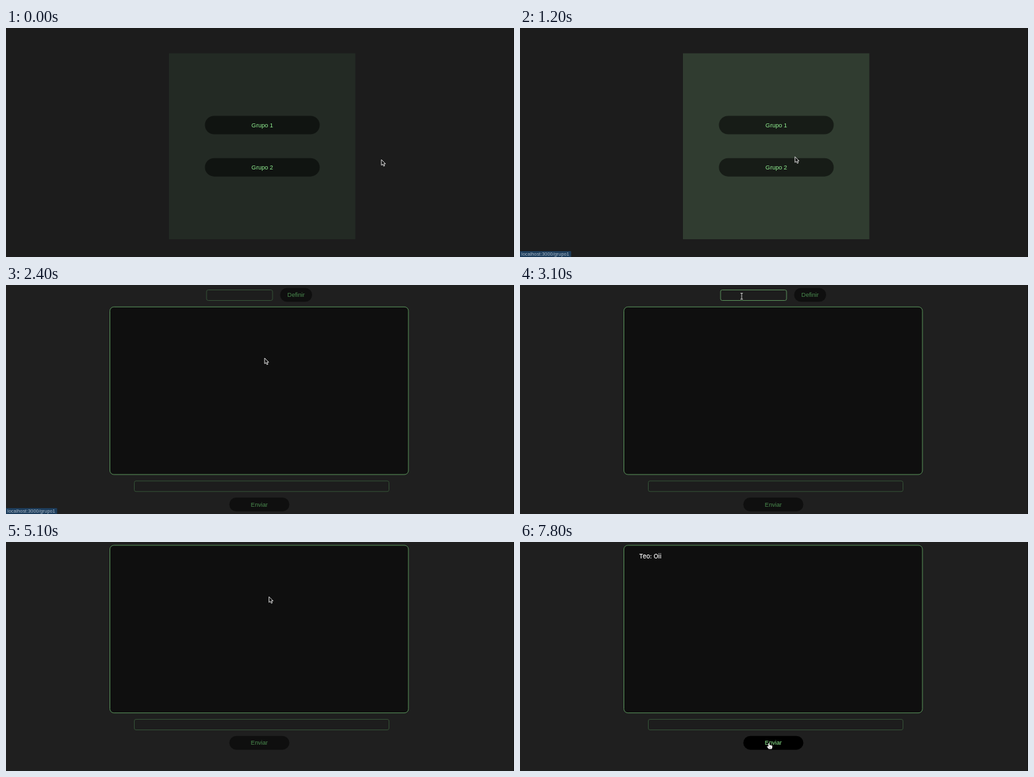
An HTML page for the animation above (8 s loop, 770 by 348 pixels).

```html
<!DOCTYPE html>
<html lang="pt">
<head>
<meta charset="utf-8">
<style>
  html, body { margin: 0; width: 100%; height: 100%; overflow: hidden; background: #1c1c1c; }
  svg { display: block; width: 770px; height: 348px; }
  text { font: 9px "Liberation Sans", Arial, sans-serif; white-space: pre; }
  .button { text-anchor: middle; font-size: 9.1px; }
  .status { font-size: 7.4px; }
  .message { font: 500 9.4px Inter, sans-serif; }
</style>
</head>
<body>
<svg id="stage" viewBox="0 0 770 348"></svg>
<script>
const LOOP = 8000, STEP = 100;
const ENTER = 2400, NAMED = 5000, SENT = 7700;
const NICK = 'Teo', TEXT = 'Oii';
const LIGHT = [144, 238, 144], DIM = [74, 138, 78], FOCUS = [122, 198, 122], EDGE = [52, 80, 54];

const stage = document.getElementById('stage');
const pen = document.createElement('canvas').getContext('2d');
pen.font = '9px "Liberation Sans", Arial, sans-serif';

const ramp = (t, from, length) => Math.min(1, Math.max(0, (t - from) / length));
const ease = p => p * p * (3 - 2 * p);
const blend = (a, b, p) => a.map((v, i) => v + (b[i] - v) * p);
const mix = (a, b, p) => `rgb(${blend(a, b, p).map(Math.round)})`;
const typed = (t, text, from) => text.slice(0, Math.max(0, Math.floor((t - from) / 150) + 1));

const rect = (x, y, w, h, r, fill, more = '') =>
  `<rect x="${x}" y="${y}" width="${w}" height="${h}" rx="${r}" fill="${fill}" ${more}/>`;
const label = (x, y, s, fill, kind = '') =>
  `<text x="${x}" y="${y}" fill="${fill}" class="${kind}">${s}</text>`;

// Pointer moves: where each ends, when it starts and how long it takes
const moves = [
  { at: [462, 98], from: 0, length: 300 },
  { at: [424, 150], from: 500, length: 500 },
  { at: [416, 201], from: 1000, length: 250 },
  { at: [411, 149], from: 1600, length: 300 },
  { at: [392, 111], from: 2300, length: 100 },
  { at: [336, 17], from: ENTER, length: 700 },
  { at: [436, 15], from: 4400, length: 400 },
  { at: [292, 278], from: NAMED, length: 300 },
  { at: [377, 305.5], from: 6800, length: 600 }
];
const position = t =>
  moves.reduce((p, m) => blend(p, m.at, ease(ramp(t, m.from, m.length))), [569, 200]);

// Pointer shapes with their hot spot at 0,0
const pointers = {
  arrow: '<path d="M0 0V8.6L2 6.9L3.5 10L5 9.3L3.6 6.3H6.2Z" fill="#111" stroke="#eee" stroke-width=".9"/>',
  hand: '<path d="M-1 .7Q0-.6 1 .7L1.4 3.2Q2.8 2.4 3.4 3.5Q5 2.9 5.6 4.4V6.6L4.6 9.2H0L-2.8 5.6Q-2.6 4.3-.6 5Z" fill="#fff" stroke="#222" stroke-width=".5"/>' +
    '<path d="M1.2 5.8V7.8M2.7 5.8V7.8" stroke="#444" stroke-width=".5"/>',
  beam: '<path d="M-1.8-4.5H1.8M0-4.5V4.5M-1.8 4.5H1.8" fill="none" stroke="#ddd" stroke-width=".9"/>'
};

const button = (name, x, y, w, h, base = DIM) =>
  ({ name, x, y, w, h, base, pointer: 'hand', draw: drawButton });
const field = (x, y, w, text, focus, caret) =>
  ({ x, y, w, h: 17, text, focus, caret, pointer: 'beam', draw: drawField });

// Controls on the page at a given time
function controls(t) {
  if (t < ENTER) return [1, 2].map(n => button('Grupo ' + n, 301.5, 69.3 + 64.2 * n, 174, 28, LIGHT));
  const top = t < NAMED ? 0 : -28.3;
  const list = [
    field(194, 297.3 + top, 387, t < SENT ? typed(t, TEXT, 6100) : '',
      ramp(t, 5300, 300) - ramp(t, 7600, 200), t >= 5400 && t < SENT),
    button('Enviar', 338.5, 323 + top, 91, 21)
  ];
  if (t < NAMED) list.push(
    field(303.5, 7, 101, typed(t, NICK, 3650), ramp(t, 3000, 200) - ramp(t, 4800, 200), t >= 3200 && t < 4900),
    button('Definir', 415.5, 4.5, 48.5, 21));
  return list;
}

function target(t) {
  const [x, y] = position(t);
  return controls(t).find(c => x >= c.x && x <= c.x + c.w && y >= c.y && y <= c.y + c.h);
}

// Hover fades over two steps
const hover = (t, name) => [t, t - STEP].filter(s => target(s)?.name === name).length / 2;

function drawButton(c, t) {
  const p = hover(t, c.name);
  return rect(c.x, c.y, c.w, c.h, c.h / 2, '#000', `fill-opacity="${0.53 + 0.47 * p}"`) +
    label(c.x + c.w / 2, c.y + c.h / 2 + 3.2, c.name, mix(c.base, LIGHT, p), 'button');
}

function drawField(c) {
  const end = c.x + 3.3 + pen.measureText(c.text).width;
  return rect(c.x + .5, c.y + .5, c.w - 1, c.h - 1, 2.5, '#1d1d1d', `stroke="${mix(EDGE, FOCUS, c.focus)}"`) +
    label(c.x + 3, c.y + 11.3, c.text, '#fff') +
    (c.caret ? rect(end, c.y + 3.5, .8, 10, 0, '#ddd') : '');
}

function page(t) {
  if (t < ENTER) return rect(0, 0, 770, 348, 0, '#1c1c1c') +
    rect(247, 38.5, 282.5, 282.5, 0, mix([35, 42, 36], [48, 60, 48], ramp(t, 0, 300)));
  return rect(0, 0, 770, 348, 0, '#1f1f1f') +
    rect(157.5, t < NAMED ? 33.3 : 5, 452.5, 254.7, 6, '#0f0f0f', 'stroke="#589059"') +
    (t < SENT ? '' : label(180.5, 24.7, `${NICK}: ${TEXT}`, '#fff', 'message'));
}

// The link address lingers for a moment after the pointer leaves
function status(t) {
  const link = [0, 1, 2, 3].map(n => target(t - n * STEP)?.name).find(s => s?.startsWith('Grupo'));
  return link ? rect(0, 339, 77.5, 9, 1, '#1d3d5c') +
    label(2, 346.4, 'localhost:3000/' + link.toLowerCase().replace(' ', ''), '#a9b9c8', 'status') : '';
}

function pointer(t) {
  const typing = (t >= 3700 && t <= 4400) || (t >= 6100 && t <= 6800);
  return typing ? '' :
    `<g transform="translate(${position(t)})">${pointers[target(t)?.pointer ?? 'arrow']}</g>`;
}

function draw(now) {
  const t = Math.floor(now % LOOP / STEP) * STEP;
  stage.innerHTML = page(t) + controls(t).map(c => c.draw(c, t)).join('') +
    rect(769, 0, 1, 348, 0, '#131313') + status(t) + pointer(t);
  requestAnimationFrame(() => draw(performance.now() - start));
}
const start = performance.now();
draw(0);
</script>
</body>
</html>
```
